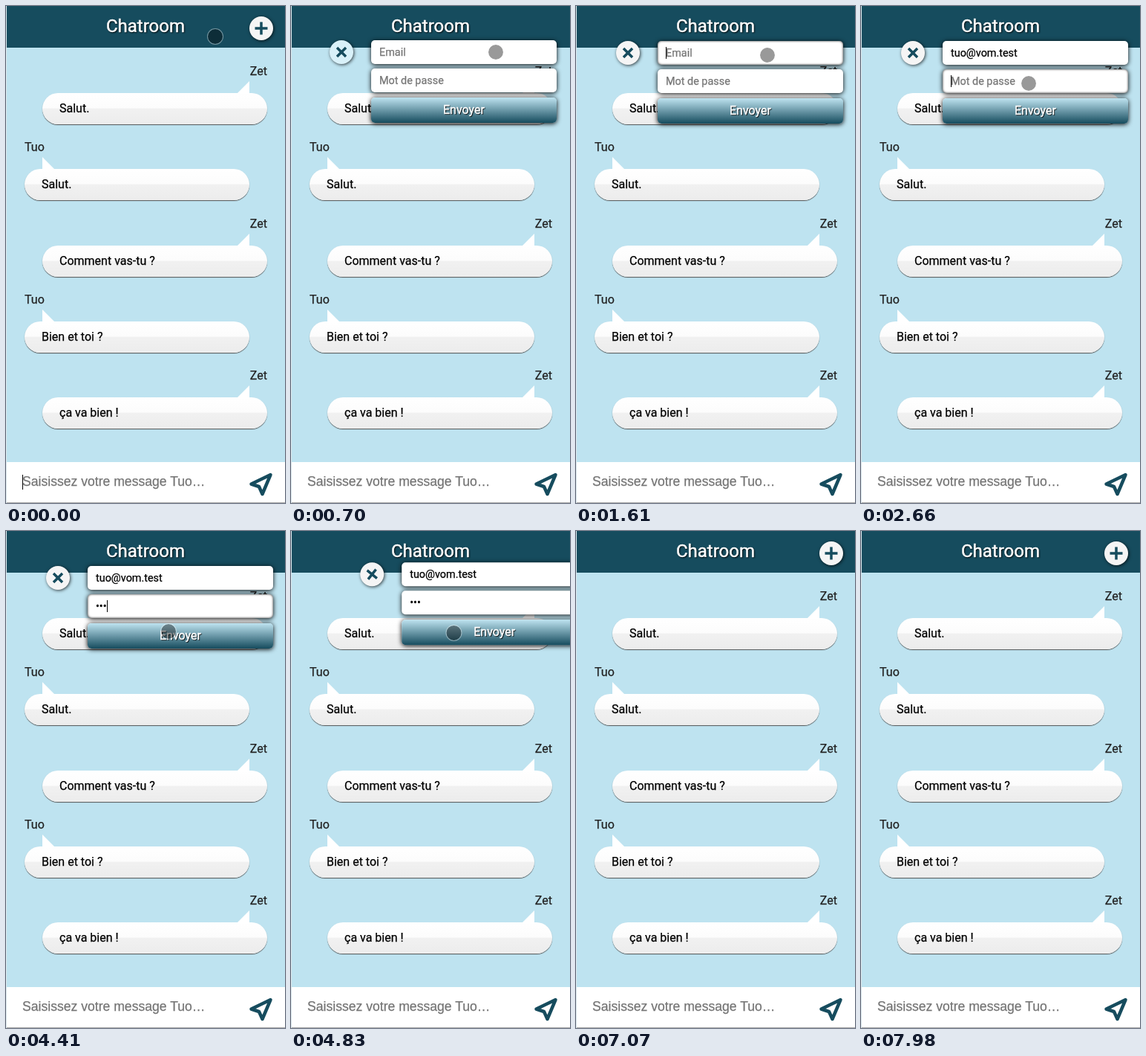
An HTML page that plays this animation: 376x668 px, repeating every 8000 ms.

```html
<!DOCTYPE html>
<html lang="fr">
<head>
<meta charset="utf-8">
<title>Chatroom</title>
<style>
  html, body { margin: 0; width: 100%; height: 100%; overflow: hidden; }
  #stage { position: relative; width: 376px; height: 668px; overflow: hidden; background: #bee3f0; font: 16px Roboto, sans-serif; -webkit-text-stroke: 0.25px; }
  #stage div, #stage svg { position: absolute; box-sizing: border-box; white-space: pre; }
  #head { left: 0; top: 0; width: 376px; height: 56px; background: #164c5e; color: #fff; font-size: 24px; line-height: 55px; text-align: center; text-shadow: 1px 1px 2px #000; -webkit-text-stroke: 0.5px; }
  #edge { left: 0; top: 0; width: 1px; height: 668px; background: #dce8ed; }
  .name { line-height: 20px; color: #222; }
  .bubble { width: 303px; height: 42px; padding-left: 23px; border-radius: 21px; line-height: 41px; color: #000;
    background: linear-gradient(#fff, #fcfcfc 48%, #f1f1f1 50%, #ececec); box-shadow: 0 1px 1px #555; }
  .tail { width: 17px; height: 17px; background: #fff; }
  #foot { left: 0; top: 613px; width: 376px; height: 55px; padding-left: 22px; background: #fff; border-bottom: 1px solid #aaa;
    color: #757575; font: 17.6px/52px "Liberation Sans", Arial, sans-serif; }
  #menu { left: 0; top: 0; width: 376px; height: 200px; }
  #toggle { left: 54px; top: 47px; width: 32px; height: 32px; border-radius: 50%; box-shadow: 1px 1px 4px #000b; }
  #toggle svg { left: 0; top: 0; }
  .field, #send { left: 110px; width: 250px; border-radius: 5px; box-shadow: 0 1px 6px #000; }
  .field { height: 32px; padding-left: 11px; background: #fff; font-size: 14.4px; line-height: 33px; }
  .field.focus { box-shadow: 0 1px 6px #000, inset 0 0 3px #000c; }
  #send { top: 124px; height: 34px; color: #fff; line-height: 34px; text-align: center; text-shadow: 1px 1px 1px #000;
    background: linear-gradient(#bee3f0, #164c5e); -webkit-text-stroke: 0.4px; }
  .caret { width: 1px; background: #000; }
  #dot { left: -11px; top: -11px; width: 22px; height: 22px; border-radius: 50%; background: #0006; border: 1.5px solid #fff6; background-clip: padding-box; }
</style>
</head>
<body>
<div id="stage">
  <div id="head">Chatroom</div>
  <div id="foot">Saisissez votre message Tuo…</div>
  <div id="footCaret" class="caret" style="left:22px;top:630px;height:20px"></div>
  <svg width="376" height="668" fill="none" stroke="#164c5e" stroke-width="4.5" stroke-linejoin="round">
    <path d="M356.5 630 330.5 642.5 341 646 345.5 656Z"/>
  </svg>
  <div id="menu">
    <div id="toggle">
      <svg width="32" height="32" stroke="#164c5e" stroke-width="3.5"><path id="plus" d="M7.5 16H24.5M16 7.5V24.5"/></svg>
    </div>
    <div id="email" class="field" style="top:47px"></div>
    <div id="pass" class="field" style="top:85px"></div>
    <div id="send">Envoyer</div>
    <div id="caret" class="caret" style="height:16px"></div>
  </div>
  <div id="edge"></div>
  <div id="dot"></div>
</div>
<script>
const $ = id => document.getElementById(id);
const LOOP = 8000, ADDRESS = 'tuo@vom.test';

function add(className, text, style) {
  const el = document.createElement('div');
  el.className = className;
  el.textContent = text;
  el.style.cssText = style;
  $('stage').insertBefore(el, $('menu'));
}

['Salut.', 'Salut.', 'Comment vas-tu ?', 'Bien et toi ?', 'ça va bien !'].forEach((text, i) => {
  const top = Math.round(116.9 + i * 102.35), mine = i % 2;
  add('name', mine ? 'Tuo' : 'Zet', `top:${top - 39}px;${mine ? 'left:25px' : 'right:24px'}`);
  add('bubble', text, `top:${top}px;left:${mine ? 25 : 49}px`);
  add('tail', '', `top:${top - 16}px;left:${mine ? 49 : 311}px;clip-path:polygon(${mine ? '0 0' : '100% 0'},100% 100%,0 100%)`);
});

const ease = p => p * p * (3 - 2 * p);

// Eased interpolation through keys of [time, ...values].
function track(keys, t) {
  const i = keys.findIndex(k => k[0] > t);
  if (i < 0) return keys[keys.length - 1].slice(1);
  if (!i) return keys[0].slice(1);
  const a = keys[i - 1], b = keys[i], p = ease((t - a[0]) / (b[0] - a[0]));
  return a.slice(1).map((v, j) => v + (b[j + 1] - v) * p);
}

const dotPath = [[0, 282, 41], [230, 342, 31], [330, 342, 31], [700, 276, 62], [980, 268, 64], [1120, 268, 64],
  [1470, 258, 66], [2450, 258, 66], [2660, 226, 104], [3990, 226, 104], [4410, 219, 135], [4620, 218, 138],
  [4760, 218, 138], [5250, 244, 119]];
// Offset of the sliding panel and rotation of its icon.
const menuPath = [[270, 274, -33, 0], [690, -2, -1, 45], [880, -2, -1, 45], [980, 0, 0, 45], [4700, 0, 0, 45], [5250, 274, -33, 0]];

function fill(id, value, hint, focus) {
  const el = $(id);
  el.textContent = value || hint;
  el.style.color = value ? '#000' : '#757575';
  el.classList.toggle('focus', focus);
}

function count(t, start, step, max) {
  return Math.max(0, Math.min(max, Math.floor((t - start) / step) + 1));
}

const pen = document.createElement('canvas').getContext('2d');

function draw(t) {
  const [x, y] = track(dotPath, t);
  $('dot').style.transform = `translate(${x}px,${y}px)`;
  $('dot').style.opacity = t < 5390 ? 1 : t < 5460 ? 0.5 : 0;

  const [mx, my, turn] = track(menuPath, t);
  $('menu').style.transform = `translate(${mx}px,${my}px)`;
  $('plus').setAttribute('transform', `rotate(${turn} 16 16)`);
  $('toggle').style.background = t > 270 && t < 1190 ? '#d9f1f9' : '#f5f5f5';
  $('footCaret').hidden = t >= 270;

  const onEmail = t >= 1400 && t < 2650, onPass = t >= 2650 && t < 4700;
  const email = ADDRESS.slice(0, count(t, 1680, 57, ADDRESS.length));
  const pass = '•'.repeat(count(t, 3430, 140, 3));
  fill('email', email, 'Email', onEmail);
  fill('pass', pass, 'Mot de passe', onPass);

  pen.font = '14.4px Roboto, sans-serif';
  const caret = $('caret');
  caret.hidden = !onEmail && !onPass;
  caret.style.left = 121 + pen.measureText(onEmail ? email : pass).width + 'px';
  caret.style.top = (onEmail ? 55 : 93) + 'px';
}

const start = performance.now();
function tick() {
  draw((performance.now() - start) % LOOP);
  requestAnimationFrame(tick);
}
tick();
</script>
</body>
</html>
```
